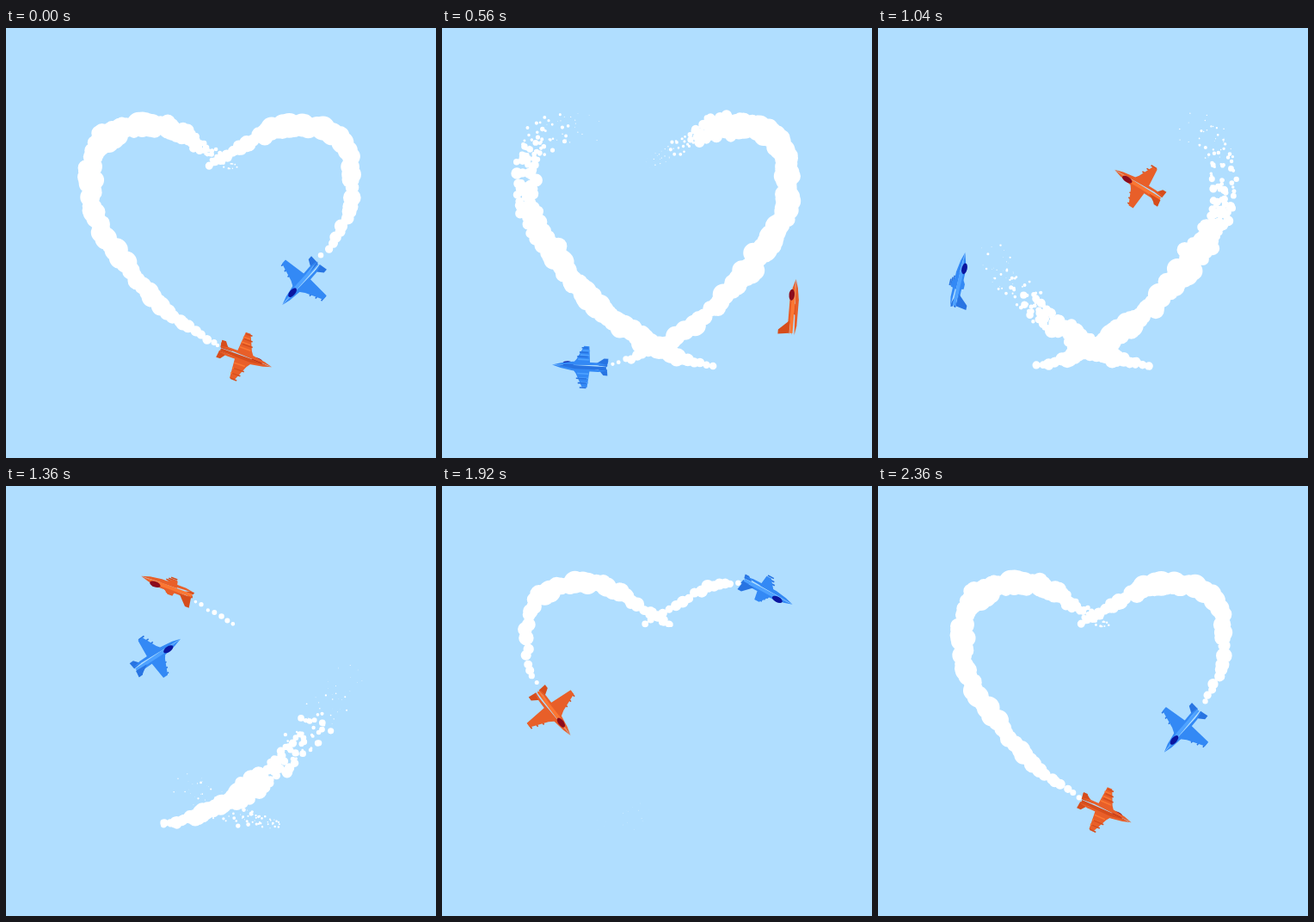
Recreate the animation shown at these times as an HTML page with a canvas. Size 500x500 px, loop 2.4 s.

```html
<!DOCTYPE html>
<html lang="en">
<head>
<meta charset="utf-8">
<title>Sky heart</title>
<style>
  html, body { margin: 0; width: 100%; height: 100%; overflow: hidden; background: #b0deff; }
  canvas { display: block; width: 100vw; height: 100vh; }
</style>
</head>
<body>
<canvas id="sky"></canvas>
<script>
const LOOP = 2400, TICK = 40, SIZE = 500;
const TAIL_LAG = 80, PUFF_GAP = 20, SMOKE_TIME = 1370, DISSOLVE = 490;

const canvas = document.getElementById('sky');
const ctx = canvas.getContext('2d');
const scale = window.devicePixelRatio || 1;
canvas.width = canvas.height = SIZE * scale;

// One lap at even time steps: x, y, bank in degrees. Both jets fly it, one mirrored.
const lap = [
  [277, 383, 152], [344, 393, 136], [393, 367, 110], [409, 314, 84],
  [385, 246, 58], [318, 192, 34], [246, 150, 48], [175, 113, 76],
  [107, 135, 52], [104, 218, 22], [151, 290, 3], [210, 346, 95]
];

const mod = (a, n) => ((a % n) + n) % n;
const clamp = v => Math.max(0, Math.min(1, v));

// Catmull-Rom through the lap
function pose(jet, time) {
  const p = mod(time - jet.lag, LOOP) / LOOP * lap.length;
  const i = Math.floor(p), u = p - i;
  const [a, b, c, d] = [-1, 0, 1, 2].map(k => lap[mod(i + k, lap.length)]);
  const [x, y, bank] = b.map((v, k) => v + u / 2 * (c[k] - a[k]
    + u * (2 * a[k] - 5 * v + 4 * c[k] - d[k]
    + u * (3 * (v - c[k]) + d[k] - a[k]))));
  return { x: jet.side > 0 ? SIZE - x : x, y, roll: bank * Math.PI / 180 };
}

function seeded(seed) {
  return () => {
    seed = (seed * 16807) % 2147483647;
    return seed / 2147483647;
  };
}

function makePuffs(jet, seed) {
  const rnd = seeded(seed), count = Math.floor(SMOKE_TIME / PUFF_GAP);
  return Array.from({ length: count + 1 }, (_, i) => {
    const at = 1150 + jet.lag + i * PUFF_GAP;
    const { x, y } = pose(jet, at);
    const ramp = Math.min(1, 0.3 + 0.06 * i, 0.36 + 0.06 * (count - i));
    const turn = rnd() * 6.28;
    return {
      x: x + (rnd() - 0.5) * 5 * ramp,
      y: y + (rnd() - 0.5) * 5 * ramp,
      born: at + TAIL_LAG,
      size: ramp * (0.8 + rnd() * 0.4),
      breakAt: 820 + 130 * ramp + rnd() * 120,
      dots: Array.from({ length: 6 }, (_, k) => ({
        angle: turn + k * 1.05 + rnd() * 0.6,
        reach: 0.5 + rnd() * 0.65,
        size: 0.75 + rnd() * 0.45
      }))
    };
  });
}

function makeJet(side, lag, seed, color) {
  const jet = { side, lag, color };
  jet.puffs = makePuffs(jet, seed);
  return jet;
}

const jets = [
  makeJet(1, 380, 811, { main: '#3389f5', light: '#4ea2ff', dark: '#2874e2', glass: '#0b16a0' }),
  makeJet(-1, 0, 4207, { main: '#e85f29', light: '#fb7733', dark: '#d64d1c', glass: '#8b0b1c' })
];

function drawSmoke(puffs, time) {
  ctx.fillStyle = '#fff';
  ctx.beginPath();
  const dot = (x, y, r) => {
    ctx.moveTo(x + r, y);
    ctx.arc(x, y, r, 0, 7);
  };
  for (const p of puffs) {
    const age = mod(time - p.born, LOOP);
    const u = clamp((age - p.breakAt) / DISSOLVE);
    if (u === 1) continue;
    const full = p.size * (2.5 + 11.5 * (1 - Math.exp(-age / 170)));
    if (u === 0) dot(p.x, p.y, full * 0.9);
    const loose = 0.38 * clamp((age - 150) / 500) + 0.95 * Math.pow(u, 0.6);
    const radius = 0.64 * full * Math.pow(1 - u, 1.5);
    for (const d of p.dots) {
      const reach = full * loose * d.reach;
      dot(p.x + Math.cos(d.angle) * reach, p.y + Math.sin(d.angle) * reach, radius * d.size);
    }
  }
  ctx.fill();
}

// Half outlines, nose towards +x
const wing = [[11, 3], [6, 11], [-2, 32], [-8, 32], [-10, 4]];
const tail = [[-20, 3], [-26, 12], [-31, 12], [-30, 2]];
const fin = [[-15, 4], [-26, 16], [-31, 16], [-29, 3]];
const hull = [[34, 0], [24, 3], [10, 5.2], [-20, 5.2], [-31, 3.2]];
const stripe = [[29, 0], [8, 3.2], [-29, 2.4], [-29, -1], [8, -1]];

function drawJet(jet, time) {
  const { color } = jet;
  const { x, y, roll } = pose(jet, time);
  const back = pose(jet, time - 30), ahead = pose(jet, time + 30);
  const flat = Math.cos(roll), rise = Math.sin(roll), above = flat > 0;

  const poly = (pts, k, fill) => {
    ctx.beginPath();
    pts.forEach(([px, py]) => ctx.lineTo(px, py * k));
    ctx.closePath();
    ctx.fillStyle = fill;
    ctx.fill();
  };
  const line = (from, to, h, stroke) => {
    ctx.beginPath();
    ctx.moveTo(from, h);
    ctx.lineTo(to, h);
    ctx.lineWidth = 1.6;
    ctx.strokeStyle = stroke;
    ctx.stroke();
  };
  const drawWing = k => {
    const stores = () => {
      for (const span of [17, 24, 31])
        line(11 - span / 3, -7, span * k - 2 * rise, color.dark);
    };
    if (above) stores();
    poly(tail, k, color.dark);
    poly(wing, k, color.main);
    if (above) return;
    for (const span of [11, 18, 25]) line(8 - span / 3, -9, span * k, color.light);
    stores();
  };
  const drawHull = () => {
    poly(hull, 1, color.main);
    poly(hull, -1, color.main);
    poly(stripe, above ? 1 : -1, above ? color.light : color.dark);
  };
  const drawTop = () => {
    ctx.beginPath();
    ctx.ellipse(15.5, 3.4 * rise, 6.5, 3.2, 0, 0, 7);
    ctx.fillStyle = color.glass;
    ctx.fill();
    poly(fin, rise, color.dark);
  };

  ctx.save();
  ctx.translate(x, y);
  ctx.rotate(Math.atan2(ahead.y - back.y, ahead.x - back.x));
  ctx.scale(1, jet.side);
  if (!above) drawTop();
  drawWing(flat);
  drawWing(-flat);
  drawHull();
  if (above) drawTop();
  ctx.restore();
}

function render(now) {
  const time = Math.floor((now + 2) / TICK) * TICK % LOOP;
  ctx.setTransform(scale, 0, 0, scale, 0, 0);
  ctx.fillStyle = '#b0deff';
  ctx.fillRect(0, 0, SIZE, SIZE);
  for (const jet of jets) {
    drawSmoke(jet.puffs, time);
    drawJet(jet, time);
  }
}

let begin;
function loop(now) {
  begin ??= now;
  render(now - begin);
  requestAnimationFrame(loop);
}
render(0);
requestAnimationFrame(loop);
</script>
</body>
</html>
```
